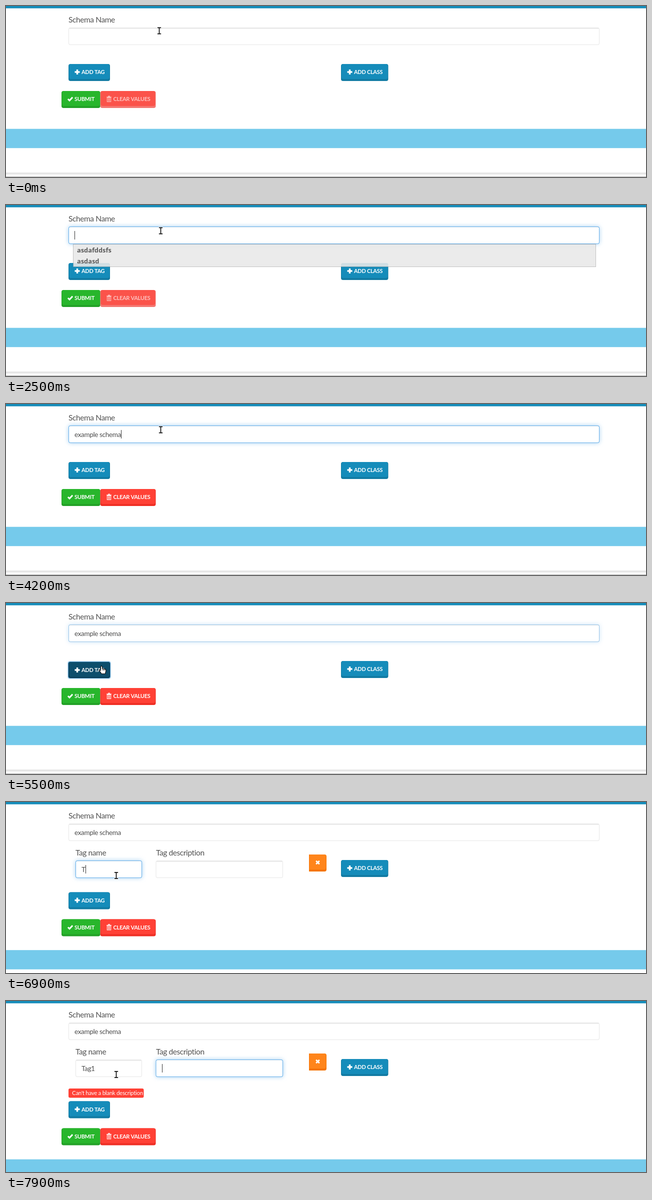
Write an HTML page with a canvas that moves like this. It is 1280 by 342 pixels and loops after 8000 ms.

```html
<!DOCTYPE html>
<html lang="en">
<head>
<meta charset="utf-8">
<title>Schema form</title>
<style>
  html, body { margin: 0; width: 100%; height: 100%; overflow: hidden; background: #fff; }
  canvas { display: block; width: 1280px; height: 342px; }
</style>
</head>
<body>
<canvas id="stage"></canvas>
<script>
const W = 1280, H = 342, LOOP = 8000, STEP = 100;
const canvas = document.getElementById('stage');
const ctx = canvas.getContext('2d');
const ratio = window.devicePixelRatio || 1;
canvas.width = W * ratio;
canvas.height = H * ratio;

const BLUE = ['#158cba', '#127ba3'];
const GREEN = ['#28b62c', '#23a127'];
const RED = ['#ff4136', '#ef2f25'];
const ORANGE = ['#ff851b', '#f57504'];
const PRESSED = ['#0d4e6c', '#083a52'];

// [time, value] lists
const schemaKeys = [[0, ''], [2000, 'a'], [2500, ''], [2600, 'e'], [2800, 'ex'], [2900, 'exa'],
  [3000, 'exam'], [3200, 'examp'], [3400, 'exampl'], [3500, 'example '], [3600, 'example s'],
  [3800, 'example sc'], [3900, 'example sch'], [4000, 'example sche'], [4100, 'example schem'],
  [4200, 'example schema']];
const tagKeys = [[0, ''], [6900, 'T'], [7100, 'Ta'], [7200, 'Tag'], [7400, 'Tag1']];
// [time, x, y]
const pointerPath = [[0, 306.5, 49.5], [300, 309.5, 51.5], [4600, 309.5, 51.5], [4900, 292, 4],
  [5000, 280, 22], [5300, 191, 125], [5600, 191, 128], [5800, 197, 133], [6500, 220.5, 147]];

const clamp = v => Math.max(0, Math.min(1, v));
const ramp = (t, from, to) => clamp((t - from) / (to - from));
const within = (t, from, to) => t >= from && t < to;
const latest = (keys, t) => keys.filter(k => k[0] <= t).pop()[1];

function pointerAt(t) {
  const i = pointerPath.findIndex(p => p[0] > t);
  if (i < 0) return pointerPath[pointerPath.length - 1].slice(1);
  const a = pointerPath[i - 1], b = pointerPath[i], k = ramp(t, a[0], b[0]);
  return [a[1] + (b[1] - a[1]) * k, a[2] + (b[2] - a[2]) * k];
}

function mix(a, b, k) {
  return `rgb(${a.map((v, i) => Math.round(v + (b[i] - v) * k)).join()})`;
}

function rect(x, y, w, h, color) {
  ctx.fillStyle = color;
  ctx.fillRect(x, y, w, h);
}

function round(x, y, w, h, r, color) {
  ctx.beginPath();
  ctx.roundRect(x, y, w, h, r);
  ctx.fillStyle = color;
  ctx.fill();
}

function path(points, close) {
  ctx.beginPath();
  points.forEach(p => ctx.lineTo(p[0], p[1]));
  if (close) ctx.closePath();
}

function setFont(size, weight = 400) {
  ctx.font = `${weight} ${size}px Lato, sans-serif`;
  ctx.letterSpacing = `${-0.026 * size}px`;
}

function text(str, x, y, size, color, weight) {
  setFont(size, weight);
  ctx.fillStyle = color;
  ctx.fillText(str, x, y);
}

const label = (str, x, y) => text(str, x, y, 15.5, '#505050');

function field(x, y, w, focus, value, caret) {
  const h = 35;
  ctx.save();
  if (focus > 0) {
    ctx.shadowColor = `rgba(102,175,233,${0.6 * focus})`;
    ctx.shadowBlur = 8 * ratio;
  }
  round(x, y, w, h, 4, mix([231, 231, 231], [102, 175, 233], focus));
  ctx.restore();
  round(x + 1, y + 1, w - 2, h - 2, 3, '#fff');
  rect(x + 2, y + 1, w - 4, 2 - focus, `rgba(0,0,0,${0.075 - 0.04 * focus})`);
  text(value, x + 12, y + 22.5, 13.5, '#4d4d4d');
  if (caret) {
    const end = x + 12 + ctx.measureText(value).width;
    rect(Math.round(end), y + 9, 1, 17, '#333');
  }
}

const icons = {
  plus(x, y) {
    rect(x - 5, y - 1.7, 10, 3.4, '#fff');
    rect(x - 1.7, y - 5, 3.4, 10, '#fff');
  },
  check(x, y) {
    path([[x - 4.6, y], [x - 1.5, y + 3], [x + 4.6, y - 3.4]]);
    ctx.lineWidth = 3;
    ctx.stroke();
  },
  cross(x, y) {
    ctx.lineWidth = 3;
    for (const s of [-1, 1]) {
      path([[x - 3.3, y - 3.3 * s], [x + 3.3, y + 3.3 * s]]);
      ctx.stroke();
    }
  },
  trash(x, y) {
    ctx.lineWidth = 1;
    rect(x - 5, y - 4.5, 10, 1.3, '#fff');
    ctx.strokeRect(x - 1.5, y - 5.9, 3, 1.6);
    ctx.strokeRect(x - 3.7, y - 2.5, 7.4, 8);
    for (const dx of [-1.6, 0, 1.6]) rect(x + dx - 0.4, y - 1.5, 0.8, 6, '#fff');
  }
};

// Sinking lowers the top edge while the bottom edge stays in place.
function button(x, y, w, colors, icon, str = '', opt = {}) {
  const { sink = 0, alpha = 1, ring = false, radii = 4 } = opt;
  ctx.save();
  ctx.globalAlpha = alpha;
  if (ring) {
    ctx.save();
    ctx.shadowColor = 'rgba(102,175,233,.8)';
    ctx.shadowBlur = 3 * ratio;
    round(x - 1, y + sink - 1, w + 2, 36 - sink, radii, '#5a9fcb');
    ctx.restore();
  }
  round(x, y + sink, w, 34 - sink, radii, colors[1]);
  round(x + 1, y + sink, w - 2, 30, radii, colors[0]);
  ctx.strokeStyle = '#fff';
  icons[icon](x + 17.5, y + 16 + sink);
  text(str, x + 26, y + 20 + sink, 11, '#fff', 700);
  ctx.restore();
}

function suggestions(alpha) {
  ctx.save();
  ctx.globalAlpha = alpha;
  rect(134, 78, 1046, 46, '#a5a5a5');
  rect(135, 79, 1044, 44, '#fff');
  ctx.globalAlpha = Math.min(1, alpha * 1.35);
  ctx.font = '700 12.8px "Noto Sans", sans-serif';
  ctx.letterSpacing = '0px';
  ctx.fillStyle = '#4a4a4a';
  ctx.fillText('asdafddsfs', 142, 95);
  ctx.fillText('asdasd', 142, 117);
  ctx.restore();
}

function beam(x, y) {
  const strokes = (color, width) => {
    ctx.strokeStyle = color;
    ctx.lineWidth = width;
    ctx.beginPath();
    for (const s of [-1, 1]) {
      ctx.moveTo(x - 2.8, y + 6.2 * s);
      ctx.lineTo(x + 2.8, y + 6.2 * s);
    }
    ctx.moveTo(x, y - 6.2);
    ctx.lineTo(x, y + 6.2);
    ctx.stroke();
  };
  ctx.lineCap = 'square';
  strokes('#fff', 3.6);
  strokes('#111', 1.7);
  ctx.lineCap = 'butt';
}

function outlined(x, y, points, fill, line) {
  path(points.map(p => [x + p[0], y + p[1]]), true);
  ctx.fillStyle = fill;
  ctx.strokeStyle = line;
  ctx.lineWidth = 1.2;
  ctx.fill();
  ctx.stroke();
}

function arrow(x, y) {
  outlined(x, y, [[0, 0], [0, 14], [3.2, 11], [5.4, 16], [7.8, 15], [5.6, 10.2], [10, 10]], '#111', '#fff');
}

function hand(x, y) {
  outlined(x, y, [[-1.6, 0], [0, -1], [1.4, 0], [1.6, 4.5], [4, 4.4], [6.4, 5], [8.6, 6], [9, 8.5],
    [8, 12], [7.6, 14.5], [0, 14.5], [-2.2, 11], [-5, 7.8], [-4.6, 6.4], [-1.6, 8]], '#fff', '#111');
  for (const dx of [2, 4.2, 6.4]) rect(x + dx, y + 5, 0.8, 3.2, '#111');
}

function pointer(t) {
  const [x, y] = pointerAt(t);
  const inField = within(y, 43, 78) || (t >= 5600 && y > 116);
  if (inField) beam(x, y);
  else if (within(y, 116, 150) && within(x, 125, 208)) hand(x, y);
  else arrow(x, y);
}

function draw(t) {
  const opened = t >= 5600, failed = t >= 7000;
  const shift = (opened ? 64.5 : 0) + (failed ? 20 : 0);
  const footer = (opened ? 50.5 : 0) + (failed ? 20.5 : 0);
  const schema = latest(schemaKeys, t), tag = latest(tagKeys, t);

  ctx.setTransform(ratio, 0, 0, ratio, 0, 0);
  rect(0, 0, W, H, '#fff');
  rect(0, 0, W, 4.6, BLUE[0]);

  label('Schema Name', 125, 33);
  const schemaFocus = ramp(t, 0, 400) * (1 - ramp(t, 5400, 5650));
  const schemaCaret = within(t, 300, 900) || within(t, 1500, 4800);
  field(125, 43, 1062, schemaFocus, schema, schemaCaret);

  if (opened) {
    const next = ramp(t, 7600, 7900);
    label('Tag name', 139, 106.5);
    label('Tag description', 300, 106.5);
    field(139, 117, 133, ramp(t, 6300, 6600) * (1 - next), tag, within(t, 6400, 7700));
    field(299.5, 117, 254.5, next, '', t >= 7700);
    button(606, 105, 35, ORANGE, 'cross', '', { radii: [0, 4, 4, 0] });
  }
  if (failed) {
    round(125, 175, 150.5, 18.5, 3, RED[0]);
    text("Can't have a blank description", 132, 188, 11.5, '#fff');
  }

  const pressed = within(t, 5400, 5600), hover = within(t, 5300, 5400);
  button(125, 116 + shift, 83, pressed ? PRESSED : hover ? ['#106a8c', '#0d5875'] : BLUE, 'plus', 'ADD TAG',
    { sink: pressed ? 2 : hover ? 1 : 0, ring: pressed });
  button(670, 116, 94.5, BLUE, 'plus', 'ADD CLASS');
  button(111, 170 + shift, 77.5, GREEN, 'check', 'SUBMIT');
  button(188.5, 170 + shift, 111, RED, 'trash', 'CLEAR VALUES', { alpha: schema ? 1 : 0.65 });

  rect(0, 245.7 + footer, W, 38.5, '#75caeb');
  rect(0, 333 + footer, W, 4, '#e7e7e7');
  rect(0, 341 + footer, W, 1, '#a9a9a9');

  if (within(t, 2000, 2900)) suggestions(t < 2500 ? 1 : 0.67 * (1 - ramp(t, 2500, 2800)));
  pointer(t);
}

const start = performance.now();
function frame() {
  const t = (performance.now() - start) % LOOP;
  draw(Math.floor(t / STEP) * STEP);
  requestAnimationFrame(frame);
}
frame();
</script>
</body>
</html>
```
